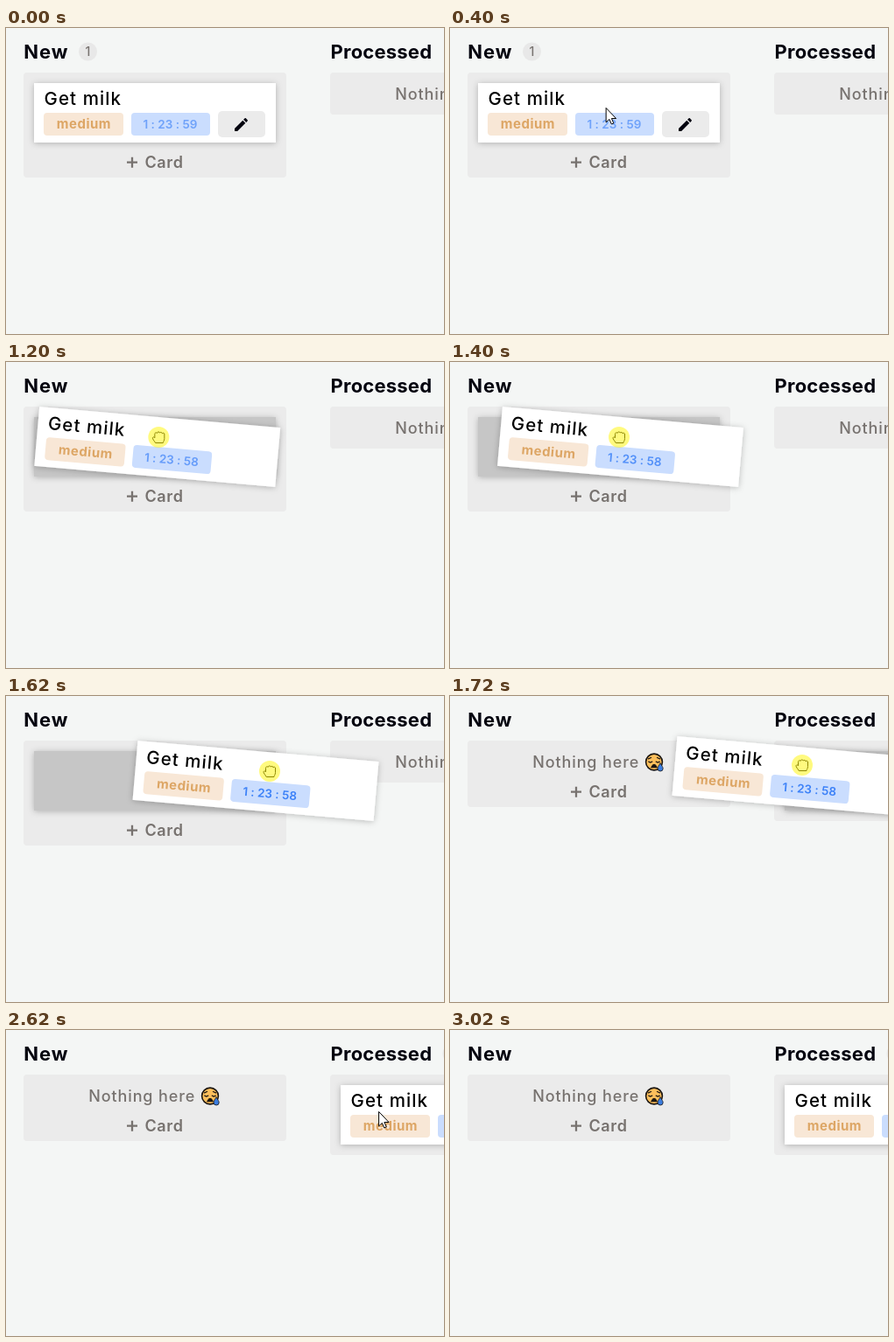
Recreate the animation shown at these times as an HTML page. Size 500 by 350 pixels, loop 3820 ms.

```html
<!DOCTYPE html>
<html lang="en">
<head>
<meta charset="utf-8">
<title>Task board</title>
<style>
  html, body { margin: 0; width: 100%; height: 100%; overflow: hidden; background: #f4f6f5; }
  svg { display: block; width: 500px; height: 350px; }
  text { font-family: Montserrat, Inter, "Open Sans", sans-serif; white-space: pre; }
  .head { font-size: 22px; font-weight: 700; fill: #04040f; }
  .note { font-size: 18px; font-weight: 500; letter-spacing: .87px; fill: #77726f; }
  .add { font-size: 18px; font-weight: 600; letter-spacing: .6px; fill: #77726f; }
  .title { font-size: 20.5px; font-weight: 500; letter-spacing: 1.1px; fill: #000; }
  .tag { font-size: 15px; font-weight: 700; letter-spacing: .5px; fill: #dda665; }
  .time { font-size: 13.5px; font-weight: 600; fill: #3d82f8; font-feature-settings: "calt" 0; }
  .count { font-size: 14px; font-weight: 500; fill: #77726f; text-anchor: middle; }
  .column { fill: #ebebeb; }
</style>
</head>
<body>
<svg viewBox="0 0 500 350">
  <defs>
    <filter id="shadow" x="-10%" y="-30%" width="120%" height="170%">
      <feDropShadow dx="0" dy="1" stdDeviation="3.5" flood-color="#000" flood-opacity=".25"/>
    </filter>
    <g id="badge">
      <circle r="10.5" fill="#e8e8e8"/>
      <text class="count" y="5">1</text>
    </g>
  </defs>

  <text class="head" x="20.3" y="35" letter-spacing=".9">New</text>
  <text class="head" x="370.6" y="35" letter-spacing=".2">Processed</text>
  <use id="newBadge" href="#badge" x="93.5" y="27"/>
  <use id="doneBadge" href="#badge" x="509" y="27"/>

  <rect id="newColumn" class="column" x="20" y="51" width="300" rx="4"/>
  <rect id="doneColumn" class="column" x="370" y="51" width="300" rx="4"/>
  <rect id="slot" y="63" width="276" height="68" fill="#c6c6c6" filter="url(#shadow)"/>

  <g id="newEmpty">
    <text class="note" x="94.3" y="82">Nothing here</text>
    <g transform="translate(233 75.5)" stroke="#1c1713" stroke-width="1.3" stroke-linecap="round" fill="none">
      <circle r="9.4" fill="#fdbf5c" stroke-width="1.6"/>
      <path d="M-6.5-3.6L-3.5-5M3.5-5L6.5-3.6M-6.3-.4Q-4.2 1.4-2.2-.4M2.2-.4Q4.2 1.4 6.3-.4"/>
      <path d="M-3 6Q0 0 3 6Z" fill="#1c1713"/>
      <path d="M7 1.5C5 4.5 4 6 4 7.4A3.1 3.1 0 0 0 10.2 7.4C10.2 6 9 4.5 7 1.5Z" fill="#3c7ee0" stroke-width=".8"/>
    </g>
  </g>
  <text id="doneEmpty" class="note" x="444.3" y="82">Nothing here</text>
  <g id="addCard">
    <path d="M138 153.7H150M144 147.7V159.7" stroke="#77726f" stroke-width="2.3"/>
    <text class="add" x="158.5" y="160">Card</text>
  </g>

  <!-- card parts are placed around the card's centre -->
  <g id="card">
    <rect x="-138" y="-34" width="276" height="68" fill="#fff" filter="url(#shadow)"/>
    <text class="title" x="-126.5" y="-9">Get milk</text>
    <rect x="-127" y="0" width="91" height="26" rx="4" fill="#f8e7d6"/>
    <text class="tag" x="-112.2" y="18">medium</text>
    <rect x="-27" y="0" width="90" height="26" rx="4" fill="#caddfe"/>
    <text id="timer" class="time" x="-13.5" y="18"></text>
    <g id="edit">
      <rect x="72" y="-2" width="54" height="30" rx="5" fill="#ebebeb"/>
      <path transform="translate(88.5 3.5) scale(.833)" fill="#04040f"
        d="M20.7 7c.4-.4.4-1 0-1.4l-2.3-2.3c-.4-.4-1-.4-1.4 0l-1.9 1.8 3.8 3.8M3 17.3V21h3.8L17.8 9.9l-3.7-3.7Z"/>
    </g>
  </g>

  <g id="pointer">
    <path id="arrow" d="M.5.5V17L4.3 13.5 6.7 19 9.2 18 6.8 12.6H12Z" fill="#fff" stroke="#000"/>
    <path id="hand" fill="#fff" stroke="#1d1a08" stroke-linejoin="round"
      d="M-3.8 6.5C-5 4-7.5 2-6.9.5C-6.3-.6-5.2-.2-4.5.8V-3.6A1.5 1.5 0 0 1-1.8-4.6A1.6 1.6 0 0 1 1.3-5A1.5 1.5 0 0 1 4-4.2A1.4 1.4 0 0 1 6.5-3V1.5C6.5 4 5 5 5 6.5Z"/>
    <circle id="press" r="12" fill="#fff500" fill-opacity=".5"/>
  </g>
</svg>
<script>
  const LOOP = 3820, GRAB = 1100, SWING = 1400, CROSS = 1720, HOVER = 1820;
  const RELEASE = 2220, DROP = 2320, LEAVE = 2520, GONE = 3020;
  const el = id => document.getElementById(id);
  const show = (id, on) => el(id).setAttribute("visibility", on ? "visible" : "hidden");
  const set = (id, name, value) => el(id).setAttribute(name, value);

  const linear = u => u;
  const easeIn = u => u * u;
  const easeOut = u => 1 - (1 - u) ** 3;
  const progress = (t, from, to) => Math.min(1, Math.max(0, (t - from) / (to - from)));
  const mix = (a, b, u) => a + (b - a) * u;

  // position after a list of moves { from, to, end, ease }
  function travel(origin, moves, t) {
    return moves.reduce((pos, { from, to, end, ease = linear }) => {
      const u = ease(progress(t, from, to));
      return pos.map((v, i) => mix(v, end[i], u));
    }, origin);
  }

  const drag = (swing, reach, cross, hover) => [
    { from: GRAB, to: SWING, end: swing, ease: easeIn },
    { from: SWING, to: 1620, end: reach },
    { from: 1620, to: CROSS, end: cross },
    { from: CROSS, to: HOVER, end: hover }
  ];
  const pointerMoves = [
    { from: 200, to: 500, end: [177, 89], ease: easeOut },
    { from: 700, to: 900, end: [172, 86] },
    ...drag([193, 86], [301, 86], [402, 79], [428, 77])
  ];
  const cardMoves = drag([194.5, 97], [285, 97], [394, 92], [432, 89.3]);

  function pointerAt(t) {
    const [x, y] = travel([194, 141], pointerMoves, t);
    const u = progress(t, LEAVE, GONE);
    return [x - 28 * u + 67 * u * u, y + 398 * u * u];
  }

  const tick = t => t < 1620
    ? Math.min(1500, Math.floor(t / 100) * 100)
    : Math.floor((t - 20) / 100) * 100 + 20;

  function drawBoard(t) {
    const crossed = t >= CROSS;
    const dragging = t >= GRAB && t < DROP;
    set("newColumn", "height", crossed ? 76 : 120);
    set("doneColumn", "height", crossed ? 92 : 48);
    set("addCard", "transform", `translate(0 ${crossed ? -44 : 0})`);
    set("slot", "x", crossed ? 382 : 32);
    show("slot", dragging);
    show("newEmpty", crossed);
    show("doneEmpty", !crossed);
    show("newBadge", t < GRAB);
    show("doneBadge", t >= DROP);

    const [x, y] = t < DROP ? travel([170, 97], cardMoves, t) : [520, 97];
    set("card", "transform", `translate(${x} ${y}) rotate(${dragging ? 5 : 0})`);
    show("edit", !dragging);
    el("timer").textContent = t < GRAB ? "1 : 23 : 59" : "1 : 23 : 58";
    set("timer", "fill-opacity", mix(.65, 1, progress(t, GRAB, 1620)));
  }

  function drawPointer(t) {
    const seen = t >= 200 && t < GONE;
    const holding = t >= GRAB && t < RELEASE;
    set("pointer", "transform", `translate(${pointerAt(t)})`);
    show("press", t >= GRAB && t < DROP);
    show("hand", holding);
    show("arrow", seen && !holding);
  }

  const start = performance.now();
  function frame() {
    const t = tick((performance.now() - start) % LOOP);
    drawBoard(t);
    drawPointer(t);
    requestAnimationFrame(frame);
  }
  frame();
</script>
</body>
</html>
```
